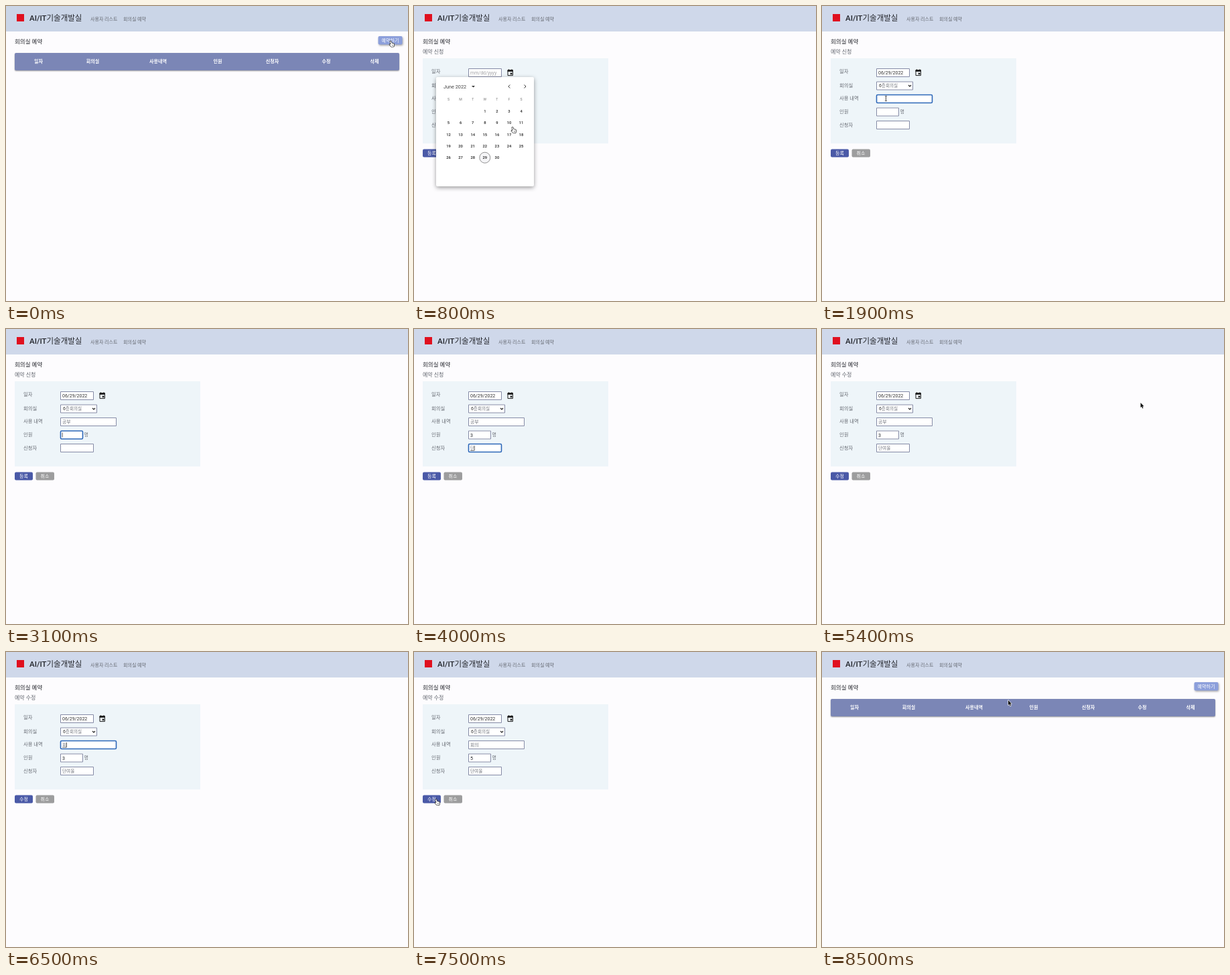
Animation of 600 by 440 pixels, one loop 8.6 s. Source, as an HTML page with a canvas:

```html
<!DOCTYPE html>
<html lang="ko">
<head>
<meta charset="utf-8">
<title>회의실 예약</title>
<style>
html, body { margin: 0; width: 100%; height: 100%; overflow: hidden; background: #fdfcfe; }
canvas { display: block; width: 600px; height: 440px; }
</style>
</head>
<body>
<canvas id="stage" width="600" height="440"></canvas>
<script>
const ctx = document.getElementById('stage').getContext('2d');
const LOOP = 8600, TICK = 100;
const FONT = 'Roboto, "Noto Sans CJK KR", "Noto Sans CJK", sans-serif';
const GREY = '#666a72', DARK = '#24262c';

// Each track lists [time, value]; a value holds until the next entry.
const pages = [[0, 'list'], [200, 'new'], [4600, 'list'], [5400, 'edit'], [7600, 'list']];
const dates = [[0, ''], [1200, '06/29/2022']];
const uses = [[0, ''], [2600, 'ㄱ'], [2800, '고'], [2900, '공'], [3000, '공부'],
  [6100, ''], [6300, 'ㅎ'], [6400, '호'], [6500, '회'], [6600, '회의']];
const counts = [[0, ''], [3300, '3'], [7000, ''], [7100, '5']];
const people = [[0, ''], [3800, 'ㄷ'], [3900, '다'], [4000, '단'], [4100, '단여'], [4200, '단여울']];
const focuses = [[0, ''], [1800, 'use'], [3100, 'count'], [3500, 'person'], [4400, ''],
  [5800, 'use'], [6800, 'count'], [7500, '']];
const carets = [[0, true], [1900, false], [2100, true], [2200, false], [2400, true]];
const rows = [[0, false], [4600, true], [8400, false]];

// [time, x, y, shape], straight moves between entries
const moves = [
  [0, 574, 52.5, 'hand'], [100, 574, 52.5, 'hand'], [200, 560, 56, 'arrow'], [500, 180, 96, 'arrow'],
  [600, 143, 98, 'hand'], [700, 143, 100, 'hand'], [800, 147, 181, 'hand'], [1000, 105, 224, 'hand'],
  [1100, 105, 224, 'hand'], [1200, 106, 222, 'arrow'], [1400, 112, 119, 'arrow'], [1600, 112, 121, 'arrow'],
  [1800, 95.5, 138, 'beam'], [2600, 95, 138, ''], [4300, 110, 180, 'arrow'], [4400, 30, 216, 'hand'],
  [4500, 190, 14, 'arrow'], [4600, 240, 80, 'arrow'], [4800, 476, 110, 'hand'], [5300, 476, 110, 'hand'],
  [5400, 475.5, 110, 'arrow'], [5500, 440, 114, 'arrow'], [5700, 190, 136, 'arrow'],
  [5800, 154, 139, 'beam'], [6000, 84, 139, 'beam'], [6100, 84, 139, ''], [7200, 100, 160, 'arrow'],
  [7400, 36, 216, 'hand'], [7500, 33, 220, 'hand'], [7600, 33, 219, 'arrow'], [7800, 250, 160, 'arrow'],
  [8000, 549, 108, 'hand'], [8100, 549, 108, 'hand'], [8300, 330, 20, 'arrow'], [8500, 278, 72, 'arrow']
];

const at = (track, t) => track.filter(k => k[0] <= t).pop()[1];

function text(s, x, cy, size, color = GREY, weight = 400, align = 'left') {
  ctx.font = `${weight} ${size}px ${FONT}`;
  ctx.textAlign = align;
  ctx.fillStyle = color;
  ctx.fillText(s, x, cy + size * 0.36);
  return ctx.measureText(s).width;
}

function box(x, y, w, h, color, r = 0) {
  ctx.fillStyle = color;
  ctx.beginPath();
  ctx.roundRect(x, y, w, h, r);
  ctx.fill();
}

function raised(blur, dx, dy, alpha, draw) {
  ctx.save();
  ctx.shadowColor = `rgba(0,0,0,${alpha})`;
  ctx.shadowBlur = blur;
  ctx.shadowOffsetX = dx;
  ctx.shadowOffsetY = dy;
  draw();
  ctx.restore();
}

function line(color, width, ...pts) {
  ctx.strokeStyle = color;
  ctx.lineWidth = width;
  ctx.beginPath();
  pts.forEach(([x, y]) => ctx.lineTo(x, y));
  ctx.stroke();
}

function shape(pts, fill, edge, width) {
  ctx.beginPath();
  pts.forEach(([x, y]) => ctx.lineTo(x, y));
  ctx.closePath();
  ctx.lineJoin = 'round';
  if (edge) {
    ctx.strokeStyle = edge;
    ctx.lineWidth = width;
    ctx.stroke();
  }
  ctx.fillStyle = fill;
  ctx.fill();
}

function header(t) {
  box(0, 0, 600, 440, '#fdfcfe');
  box(0, 0, 600, 38, t < 100 ? '#cad5e7' : '#cfd8ea');
  box(16, 12, 11, 11, '#e0101f');
  text('AI/IT기술개발실', 35, 17.5, 11.5, DARK, 500);
  text('사용자 리스트', 126, 19, 7);
  text('회의실 예약', 175, 19, 7);
  text('회의실 예약', 13, 52.5, 8.5, DARK, 500);
}

function list(t) {
  const mid = [48.5, 129.5, 227, 316, 397.5, 478, 550];
  raised(3, 1, 1.5, 0.35, () => box(555.5, 45, 36, 12.5, '#8c9fdb', 2));
  text('예약하기', 573.5, 51, 7, '#fff', 400, 'center');
  raised(2, 0, 1, 0.4, () => box(13, 70, 574, 26, '#7b86b6', 2));
  ['일자', '회의실', '사용내역', '인원', '신청자', '수정', '삭제']
    .forEach((s, i) => text(s, mid[i], 82.5, 7, '#fff', 700, 'center'));
  if (at(rows, t)) {
    [at(dates, t), '6층회의실', at(uses, t), at(counts, t), at(people, t), '수정', '삭제']
      .forEach((s, i) => text(s, mid[i], 110, 7, GREY, 400, 'center'));
  }
}

function field(x, y, w, value, t, focused, color = '#73767e', size = 6.8) {
  box(x, y, w, 13, '#fff');
  ctx.strokeStyle = focused ? '#2c67b8' : '#858ba6';
  ctx.lineWidth = focused ? 1.6 : 1;
  ctx.beginPath();
  ctx.roundRect(x + 0.5, y + 0.5, w - 1, 12, focused ? 1.5 : 0);
  ctx.stroke();
  const cy = y + 6.5;
  const tw = text(value, x + 3, cy, size, color);
  if (!focused) return;
  const end = x + 3.2 + tw;
  if (at(carets, t)) line('#222', 0.7, [end, y + 3], [end, y + 10]);
  if (value && color !== DARK && (t < 5000 || t >= 6300)) {
    line('#444', 0.7, [x + 3, y + 10.3], [end, y + 10.3]);
  }
}

function calendarIcon() {
  ctx.strokeStyle = '#1c1c1c';
  ctx.lineWidth = 1;
  ctx.strokeRect(140, 95.8, 7.4, 7.8);
  box(139.6, 95.3, 8.2, 2.6, '#1c1c1c');
  box(141, 94.2, 1, 2, '#1c1c1c');
  box(145.4, 94.2, 1, 2, '#1c1c1c');
  box(143.8, 99.6, 2.6, 2.6, '#1c1c1c');
}

function form(t, title, action) {
  const focus = at(focuses, t), date = at(dates, t);
  text(title, 13, 68, 8);
  box(13, 78, 277, 127, '#eef5f9');
  ['일자', '회의실', '사용 내역', '인원', '신청자']
    .forEach((s, i) => text(s, 26, [97, 118.5, 137.5, 157, 177][i], 7.3));

  field(81, 93, 50, date || 'mm/dd/yyyy', t, false, date ? '#333' : '#a2a2a6', 7);
  calendarIcon();
  field(81, 112.5, 55, '', t, false);
  const w = text('6', 85, 119, 6.8, '#333');
  text('층회의실', 85 + w, 119, 6.6, '#73767e');
  line('#222', 1.1, [129, 118], [131, 120], [133, 118]);
  field(81, 132, 84, at(uses, t), t, focus === 'use');
  if (t >= 5900 && t < 6100) box(84, 134, 13, 9, 'rgba(90,150,230,.4)');
  field(81, 151.5, 34, at(counts, t), t, focus === 'count', DARK, 7);
  text('명', 116.5, 157, 7);
  field(81, 171, 50, at(people, t), t, focus === 'person', '#73767e', 6.6);

  box(13, 213.5, 27, 12, '#4a59a7', 2);
  text(action, 26.5, 219.3, 7, '#fff', 400, 'center');
  box(44.5, 213.5, 27.5, 12, '#9d9d9e', 2);
  text('취소', 58, 219.3, 7, '#fff', 400, 'center');
}

function calendar() {
  raised(6, 0, 2, 0.4, () => box(33, 106, 146, 163, '#fff', 2));
  text('June 2022', 44, 120, 7.3, '#444');
  shape([[86, 119], [91, 119], [88.5, 121.6]], '#333');
  line('#333', 1, [143.3, 117.5], [140.8, 120], [143.3, 122.5]);
  line('#333', 1, [164.5, 117.5], [167, 120], [164.5, 122.5]);
  const colX = c => 51.5 + 18.1 * c;
  [...'SMTWTFS'].forEach((s, c) => text(s, colX(c), 139, 5.2, '#777', 400, 'center'));
  for (let day = 1; day <= 30; day++) {
    const slot = day + 2, x = colX(slot % 7), y = 157 + 17.3 * Math.floor(slot / 7);
    if (day === 29) {
      ctx.beginPath();
      ctx.arc(x, y, 8, 0, Math.PI * 2);
      ctx.fillStyle = '#f5f5f7';
      ctx.fill();
      ctx.strokeStyle = '#777';
      ctx.lineWidth = 0.8;
      ctx.stroke();
    }
    text(day, x, y, 5.8, '#222', 500, 'center');
  }
}

const cursors = {
  arrow() {
    shape([[0, 0], [0, 7.2], [1.6, 5.8], [2.8, 8.6], [4, 8.1], [2.9, 5.4], [5, 5.3]], '#111', '#fff', 1.2);
  },
  hand() {
    shape([[-0.8, 0.2], [0.6, 0], [1.7, 2.9], [4.6, 3.5], [5.3, 4.6], [4.8, 8], [1.3, 8.4],
      [-1.6, 5.2], [-1, 4.4], [0.4, 5]], '#fff', '#222', 1.4);
    line('#444', 0.5, [2.2, 5], [2.5, 7]);
    line('#444', 0.5, [3.6, 5], [3.7, 7]);
  },
  beam() {
    line('#333', 0.9, [0, -3.5], [0, 3.5]);
    line('#333', 0.7, [-1.6, -3.7], [1.6, -3.7]);
    line('#333', 0.7, [-1.6, 3.6], [1.6, 3.6]);
  }
};

function cursor(t) {
  const i = moves.findLastIndex(m => m[0] <= t);
  const a = moves[i], b = moves[i + 1] || a;
  if (!a[3]) return;
  const p = b === a ? 0 : (t - a[0]) / (b[0] - a[0]);
  ctx.save();
  ctx.translate(a[1] + (b[1] - a[1]) * p, a[2] + (b[2] - a[2]) * p);
  cursors[a[3]]();
  ctx.restore();
}

function draw(t) {
  header(t);
  const page = at(pages, t);
  if (page === 'list') list(t);
  else if (page === 'new') form(t, '예약 신청', '등록');
  else form(t, '예약 수정', '수정');
  if (t >= 700 && t < 1200) calendar();
  cursor(t);
}

const start = performance.now();
function loop() {
  const t = (performance.now() - start) % LOOP;
  draw(Math.floor(t / TICK) * TICK);
  requestAnimationFrame(loop);
}
loop();
</script>
</body>
</html>
```
